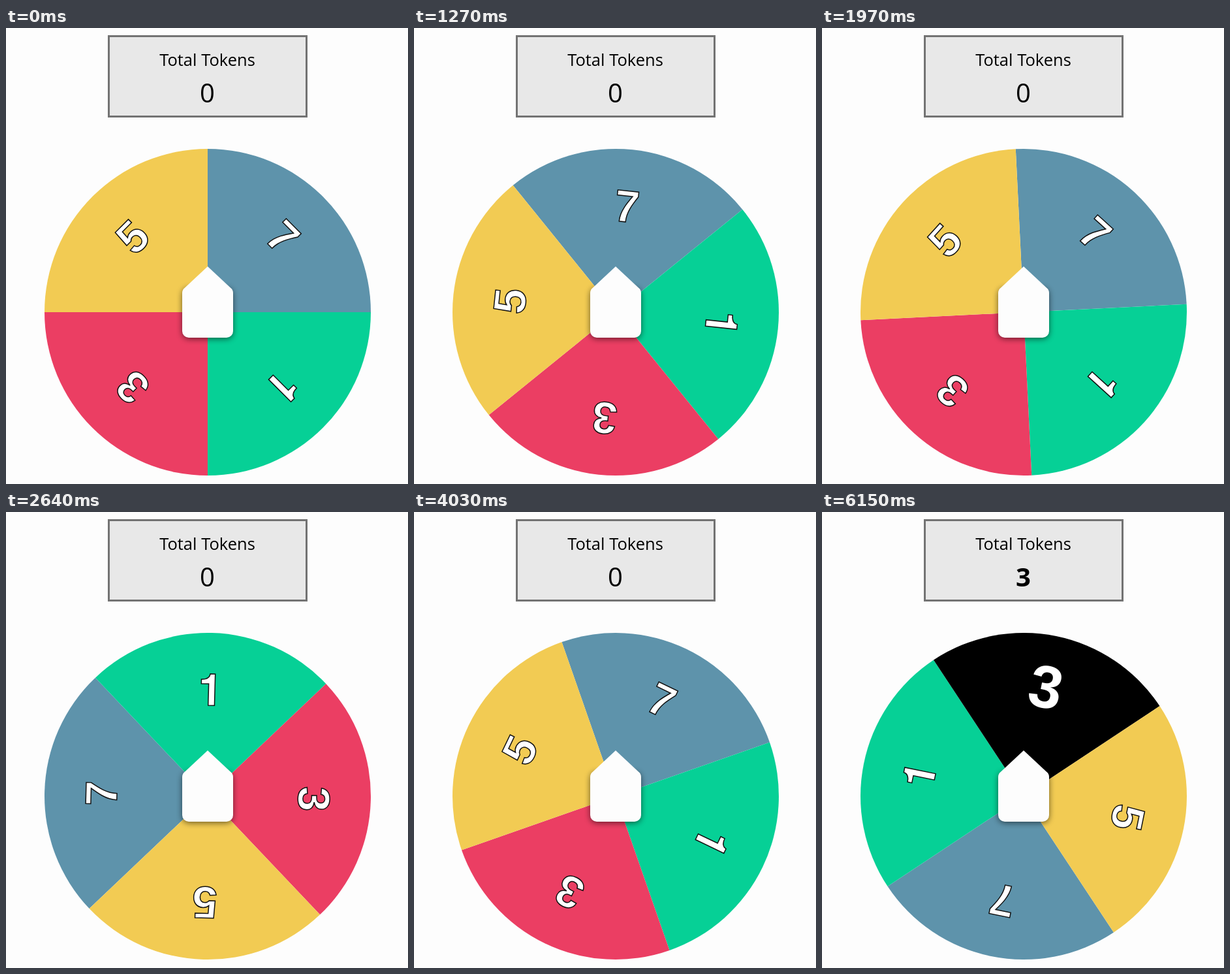
An HTML page for the animation above (6.18 s loop, 616x698 px).

```html
<!DOCTYPE html>
<html lang="en">
<head>
<meta charset="utf-8">
<title>Token wheel</title>
<style>
  html, body { margin: 0; width: 100%; height: 100%; overflow: hidden; background: #fdfdfd; }
  svg { display: block; width: 616px; height: 698px; }
  .panel { font-family: "Open Sans", "Noto Sans", sans-serif; text-anchor: middle; }
  .label {
    font: bold 69px "Liberation Sans", Arial, sans-serif;
    text-anchor: middle; fill: #fff; stroke: #111; stroke-width: 1.5;
  }
</style>
</head>
<body>
<svg viewBox="0 0 616 698">
  <defs>
    <filter id="blur" x="-50%" y="-50%" width="200%" height="200%">
      <feGaussianBlur stdDeviation="5"/>
    </filter>
  </defs>
  <rect width="616" height="698" fill="#fdfdfd"/>
  <g class="panel">
    <rect x="157.5" y="12.5" width="303" height="123" fill="#e8e8e8" stroke="#737373" stroke-width="3"/>
    <text x="308.5" y="58" font-size="25.5">Total Tokens</text>
    <text id="total" x="308.5" y="113.5" font-size="40">0</text>
  </g>
  <g transform="translate(309 435)"><g id="wheel"></g></g>
  <rect x="270" y="398" width="78" height="78" rx="10" opacity=".55" filter="url(#blur)"/>
  <rect x="270" y="396" width="78" height="78" rx="10" fill="#fdfdfd"/>
  <path d="M309 365L346 399.5Q348 402 348 406H270Q270 402 272 399.5Z" fill="#fdfdfd"/>
</svg>
<script>
const LOOP = 6180, FPS = 33, WIN_TICK = 190;
const SECTORS = [["7", "#5e93ab"], ["1", "#06d096"], ["3", "#eb3e63"], ["5", "#f2cb53"]];
const WINNER = 2;
const ONE = "M6.8 0V-48.3H-.8C-1.5-42.5-6-39.7-14.2-39.7V-32.9H-2.9V0Z";

// Decelerating spin: [tick, degrees], eased towards REST.
const REST = 4500, POWER = 2.5;
const SPIN = [[0, 0], [42, 1761], [65, 2517.2], [87, 3106.5], [113, 3631.9], [151, 4152.2], [203, 4466.5]];

const wheel = document.getElementById("wheel");
const total = document.getElementById("total");

function add(parent, tag, attrs, text = "") {
  const el = document.createElementNS("http://www.w3.org/2000/svg", tag);
  for (const key in attrs) el.setAttribute(key, attrs[key]);
  el.textContent = text;
  return parent.appendChild(el);
}

const slices = SECTORS.map(([name, color], i) => add(wheel, "path", {
  d: "M0 0V-250A250 250 0 0 1 250 0Z", fill: color, transform: `rotate(${i * 90})`
}));
const labels = SECTORS.map(([name], i) => {
  const attrs = { class: "label", transform: `rotate(${i * 90 + 45}) translate(0 -139)` };
  return name === "1" ? add(wheel, "path", { ...attrs, d: ONE }) : add(wheel, "text", attrs, name);
});

function angleAt(tick) {
  const k = Math.max(1, SPIN.findIndex(([end]) => tick <= end));
  const [t0, a0] = SPIN[k - 1], [t1, a1] = SPIN[k];
  const root = a => (REST - a) ** (1 / POWER);
  const u = root(a0) + (root(a1) - root(a0)) * (tick - t0) / (t1 - t0);
  return REST - u ** POWER;
}

function draw(ms) {
  const tick = Math.min(203, Math.ceil((Math.floor(ms / 10) + .5) * FPS / 100) - 1);
  const won = tick >= WIN_TICK;
  wheel.setAttribute("transform", `rotate(${angleAt(tick)})`);
  slices[WINNER].setAttribute("fill", won ? "#000" : SECTORS[WINNER][1]);
  labels[WINNER].style.fontSize = won ? "92px" : "";
  labels[WINNER].style.stroke = won ? "none" : "";
  total.textContent = won ? SECTORS[WINNER][0] : "0";
  total.style.fontWeight = won ? "bold" : "normal";
}

const start = performance.now();
function loop() {
  draw((performance.now() - start) % LOOP);
  requestAnimationFrame(loop);
}
loop();
</script>
</body>
</html>
```
